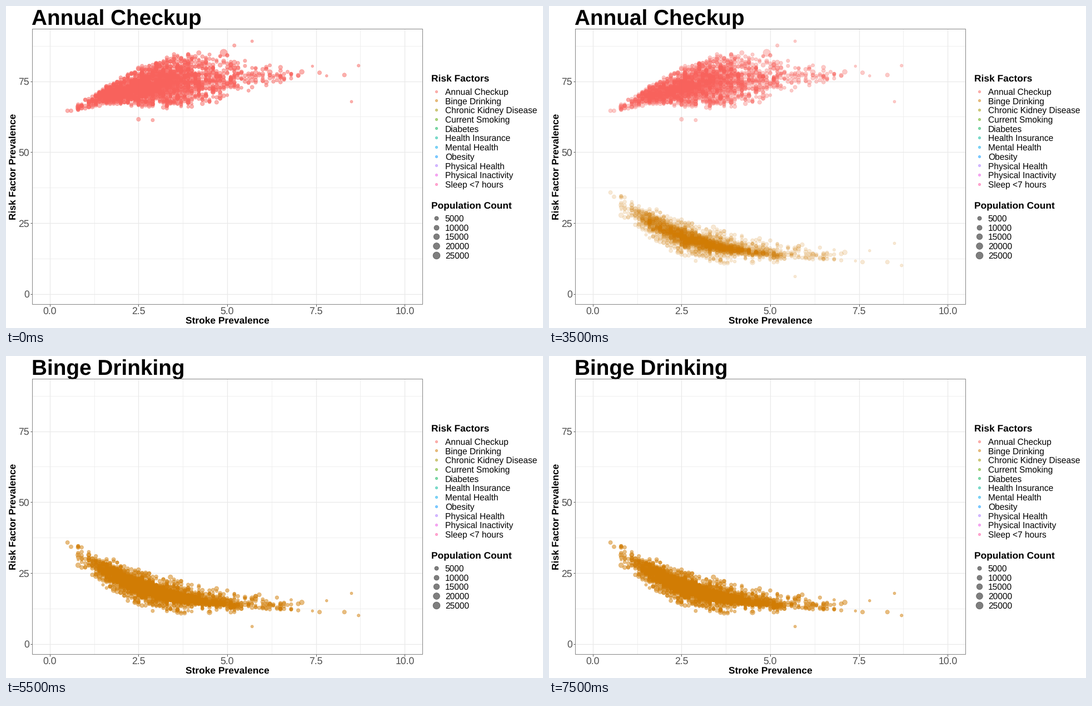
A matplotlib script that plays this animation: 966x580 px, repeating every 8 s.

```python
import numpy as np
import matplotlib.pyplot as plt
from matplotlib.animation import FuncAnimation
from matplotlib.patches import Rectangle

plt.rcParams["font.family"] = ["Liberation Sans", "DejaVu Sans"]
plt.rcParams["text.hinting"] = "none"

W, H, DPI = 966, 580, 100
PT = 72 / DPI  # points per pixel
LEFT, RIGHT, TOP, BOTTOM = 47, 749, 41, 537
RED, ORANGE = "#f8625c", "#d17c04"
STEPS = 16

FACTORS = {
    "Annual Checkup": RED,
    "Binge Drinking": ORANGE,
    "Chronic Kidney Disease": "#a09600",
    "Current Smoking": "#58a800",
    "Diabetes": "#00b252",
    "Health Insurance": "#00b99b",
    "Mental Health": "#00a8f0",
    "Obesity": "#0097ff",
    "Physical Health": "#a974ff",
    "Physical Inactivity": "#ec52e6",
    "Sleep <7 hours": "#ff4fa3",
}

# Places that stand apart: stroke, checkup, drinking, thousands of people
APART = [
    (0.5, 64.6, 35.8, 4.6), (0.6, 64.6, 34.3, 4.6), (2.5, 61.6, 14.0, 5.0),
    (2.9, 61.3, 11.7, 3.0), (4.9, 85.0, 15.2, 26.0), (5.2, 87.6, 12.4, 3.0),
    (5.7, 89.1, 6.2, 1.4), (7.4, 80.3, 11.7, 0.9), (7.6, 78.0, 11.3, 5.0),
    (7.8, 76.9, 15.3, 1.0), (8.3, 77.2, 11.3, 5.0), (8.5, 67.8, 17.9, 1.3),
    (8.7, 80.5, 10.1, 1.8),
]


def px(x):
    return 78.7 + 63.86 * np.asarray(x)


def py(y):
    return 519 - 5.113 * np.asarray(y)


def diameter(thousands):
    return 3.0 + 2.05 * np.sqrt(thousands)


def make_data():
    rng = np.random.default_rng(11)
    x = rng.gamma(7.5, 0.41, 2200).round(1)
    x = x[(x > 0.7) & (x < 7.2)]
    n = len(x)

    def spread():
        # Triangular noise with unit deviation and hard limits
        return (rng.random(n) + rng.random(n) - 1) * 2.45

    def hump(center, width):
        return np.exp(-((x - center) / width) ** 2)

    checkup = 78 - 18.5 * np.exp(-x / 1.95) + 4.2 * hump(3.9, 2.3) * spread()

    # A tight core inside a looser halo
    core = (0.65 + hump(2.1, 1.1)) * spread()
    halo = 0.5 * (x - 3) + 2.8 * hump(2.8, 3.2) * spread()
    drinking = 12 + 32.5 * np.exp(-x / 1.85)
    drinking += np.where(rng.random(n) < 0.45, halo, core)

    people = np.clip(rng.lognormal(np.log(3.7), 0.45, n), 0.3, 12)
    cloud = np.column_stack([x, checkup.round(1), drinking.round(1), people])
    return np.vstack([cloud, APART])


fig = plt.figure(figsize=(W / DPI, H / DPI), dpi=DPI, facecolor="white")
ax = fig.add_axes([0, 0, 1, 1])
ax.set(xlim=(0, W), ylim=(H, 0))
ax.axis("off")


def label(x, y, text, size, **kw):
    return ax.text(x, y, text, fontsize=size * PT, va="baseline", **kw)


def heading(x, y, text, **kw):
    return label(x, y, text, 17.33, weight="bold", **kw)


def line(xs, ys, color, width, z):
    ax.plot(xs, ys, color=color, lw=width * PT, zorder=z, solid_capstyle="butt")


def dots(x, y, d, color):
    return ax.scatter(x, y, s=((np.asarray(d) - 0.4) * PT) ** 2, c=color,
                      edgecolors=color, linewidths=0.7 * PT, alpha=0.5, zorder=4)


# Grid, ticks and frame
for k in range(9):
    major = k % 2 == 0
    style = ("#e9e9e9", 1.2, 2) if major else ("#ececec", 0.8, 1)
    gx, gy = px(1.25 * k), py(12.5 * k)
    line([gx, gx], [TOP, BOTTOM], *style)
    if k < 8:
        line([LEFT, RIGHT], [gy, gy], *style)
    if major:
        line([gx, gx], [BOTTOM, BOTTOM + 3.5], "#555555", 1, 3)
        label(gx, 555, f"{1.25 * k:.1f}", 17.6, ha="center", color="#4d4d4d")
        if k < 8:
            line([LEFT - 3.5, LEFT], [gy, gy], "#555555", 1, 3)
            label(42, gy + 6.3, f"{12.5 * k:.0f}", 17.6, ha="right", color="#4d4d4d")
ax.add_patch(Rectangle((LEFT, TOP), RIGHT - LEFT, BOTTOM - TOP, fill=False,
                       ec="#858585", lw=PT, zorder=5))

heading(398, 572, "Stroke Prevalence", ha="center")
heading(17.8, 289.5, "Risk Factor Prevalence", ha="center", rotation=90,
        rotation_mode="anchor")
title = label(46.5, 33.7, "", 38.7, weight="bold")

# Legends
heading(765, 135.7, "Risk Factors")
for i, (name, color) in enumerate(FACTORS.items()):
    y = 153.6 + 16.7 * i
    dots([773.5], [y], [4.8], color)
    label(789.8, y + 6, name, 15.5)

heading(765, 364.6, "Population Count")
for i in range(1, 6):
    y = 365.2 + 16.7 * i
    dots([773.5], [y], [diameter(5 * i)], "black")
    label(789.8, y + 5.8, str(5000 * i), 15.5)

stroke, checkup, drinking, people = make_data().T
clouds = [
    dots(px(stroke), py(checkup), diameter(people), RED),
    dots(px(stroke), py(drinking), diameter(people), ORANGE),
]


def draw(step):
    # Cross-fade between the two factors over three steps
    t = np.clip((step - 6) / 3, 0, 1)
    for cloud, share in zip(clouds, (1 - t, t)):
        cloud.set_alpha(0.5 * share)
        cloud.set_visible(share > 0)
    title.set_text("Binge Drinking" if t == 1 else "Annual Checkup")
    return [*clouds, title]


anim = FuncAnimation(fig, draw, frames=STEPS, interval=500, repeat=True, blit=False)
plt.show()
```
